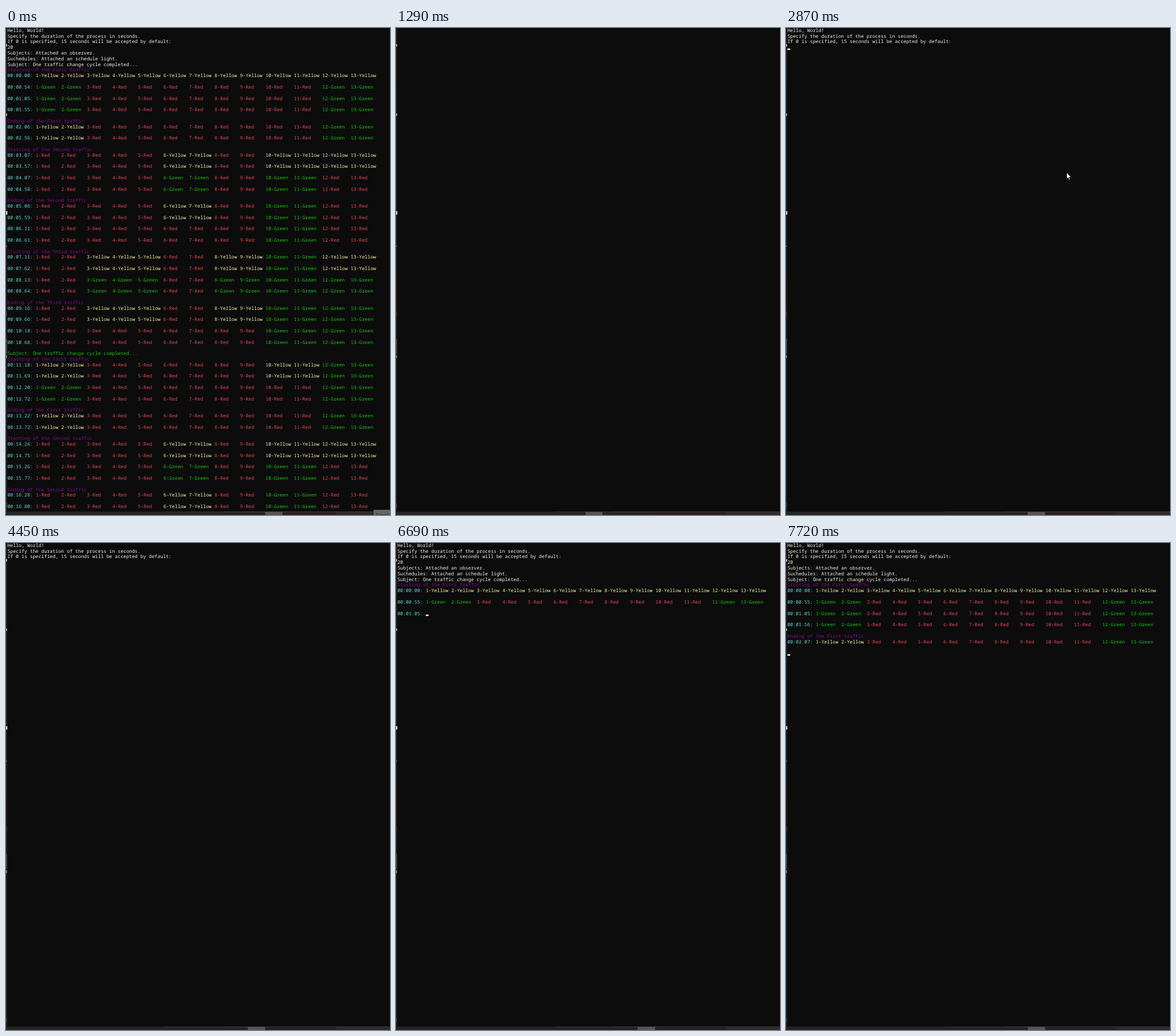
Recreate the animation shown at these times as an HTML page. Size 664 px wide and 843 px high, loop 8 s.

```html
<!DOCTYPE html>
<html lang="en">
<head>
<meta charset="utf-8">
<title>Traffic light console</title>
<style>
html, body { margin: 0; width: 100%; height: 100%; overflow: hidden; background: #0c0c0c; }
svg { display: block; }
text { font: 8.175px "Noto Sans Mono", "DejaVu Sans Mono", monospace; text-rendering: geometricPrecision; }
</style>
</head>
<body>
<svg id="stage" width="664" height="843" viewBox="0 0 664 843"></svg>
<script>
const LOOP = 8000, CW = 4.905, LH = 9.813, LEFT = 2.4;
const INK = { W: '#f2f2f2', C: '#61d6d6', M: '#8a0a92', R: '#e74856', G: '#16c60c', Y: '#f9f1a5' };
const WORD = { R: 'Red', G: 'Green', Y: 'Yellow' };
const stage = document.getElementById('stage');
const timed = [];

function add(tag, attrs, parent = stage) {
  const el = document.createElementNS('http://www.w3.org/2000/svg', tag);
  for (const k in attrs) el.setAttribute(k, attrs[k]);
  parent.appendChild(el);
  return el;
}
const rect = (x, y, width, height, fill) => add('rect', { x, y, width, height, fill });

// Text on the character grid, visible from one time until another
function print(row, col, str, ink, from, to = LOOP) {
  const el = add('text', { x: LEFT + col * CW, y: 6.8 + row * LH, fill: INK[ink] });
  el.textContent = str;
  timed.push({ el, from, to });
}

function lights(row, stamp, state, from, to, cellFrom = () => from) {
  print(row, 0, '00:' + stamp + ':', 'C', from, to);
  [...state].forEach((s, i) => {
    const col = i < 9 ? 10 + i * 9 : 91 + (i - 9) * 10;
    print(row, col, i + 1 + '-' + WORD[s], s, cellFrom(i), to);
  });
}

const INTRO = ['Hello, World!', 'Specify the duration of the process in seconds.',
  'If 0 is specified, 15 seconds will be accepted by default:'];
const SETUP = ['Subjects: Attached an observer.', 'Suchedules: Attached an schedule light.'];
const DONE = 'Subject: One traffic change cycle completed...';
const ALL = 'Y'.repeat(13), GO1 = 'GGRRRRRRRRRGG', END1 = 'YYRRRRRRRRRGG';
const PRE2 = 'RRRRRYYRRYYYY', GO2 = 'RRRRRGGRRGGRR', END2 = 'RRRRRYYRRGGRR';

// Window edges: slivers of the desktop around the console
rect(0, 0, 664, 843, '#0c0c0c');
rect(0, 0, 2.2, 843, '#1d1e1e');
[[0, 28, '#2b1c17'], [28, 4, '#b8b4ac'], [32, 22, '#2a1d18'], [54, 38, '#25241c'],
 [148, 4, '#a8a8a8'], [317, 6, '#c8c8c8'], [377, 1.2, '#8c8c8c'], [433, 57, '#32150f'],
 [491, 8, '#343434'], [538, 26, '#454542'], [567, 1.2, '#d2cfa8'], [569.5, 1.2, '#c8c8c8'],
 [822, 8, '#393939']].forEach(([y, h, c]) => rect(0, y, y > 300 && y < 330 ? 2.4 : 1.8, h, c));
rect(0, 837, 664, 6, '#242424');
rect(275, 837, 100, 1.2, '#33322a');
rect(375, 837, 195, 1.2, '#443c32');
rect(448, 838.2, 122, 4.8, '#2c1f1f');
rect(570, 837, 94, 1.2, '#4a3a37');
rect(570, 838.2, 94, 4.8, '#2f2826');
const tabs = [[448, 30], [328, 29], [418, 30]].map(([x, w]) => rect(x, 837.6, w, 5.4, '#555'));

const tip = add('g', {});
add('rect', { x: 635.5, y: 834, width: 29, height: 9, fill: '#666' }, tip);
add('text', { x: 639, y: 845.5, fill: '#222' }, tip).textContent = 'Terminal';

// First run, already complete
const FIRST_END = 1290;
const steps = [
  '>Starting of the First', ['00.00', ALL], ['00.54', GO1], ['01.05', GO1], ['01.55', GO1],
  '>Ending of the First', ['02.06', END1], ['02.56', END1],
  '>Starting of the Second', ['03.07', PRE2], ['03.57', PRE2], ['04.07', GO2], ['04.58', GO2],
  '>Ending of the Second', ['05.08', END2], ['05.59', END2], ['06.11', 'RRRRRRRRRGGRR'], ['06.61', 'RRRRRRRRRGGRR'],
  '>Starting of the Third', ['07.11', 'RRYYYRRYYGGYY'], ['07.62', 'RRYYYRRYYGGYY'],
  ['08.13', 'RRGGGRRGGGGGG'], ['08.64', 'RRGGGRRGGGGGG'],
  '>Ending of the Third', ['09.16', 'RRYYYRRYYGGGG'], ['09.66', 'RRYYYRRYYGGGG'],
  ['10.18', 'RRRRRRRRRGGGG'], ['10.68', 'RRRRRRRRRGGGG'],
  DONE,
  '>Starting of the First', ['11.18', 'YYRRRRRRRYYGG'], ['11.69', 'YYRRRRRRRYYGG'], ['12.20', GO1], ['12.72', GO1],
  '>Ending of the First', ['13.22', END1], ['13.72', END1],
  '>Starting of the Second', ['14.24', PRE2], ['14.75', PRE2], ['15.26', GO2], ['15.77', GO2],
  '>Ending of the Second', ['16.28', END2], ['16.80', END2]
];
[...INTRO, '20', ...SETUP, DONE].forEach((s, i) => print(i, 0, s, 'W', 0, FIRST_END));
let row = 7;
for (const s of steps) {
  if (Array.isArray(s)) {
    lights(row, s[0], s[1], 0, FIRST_END);
    row += 2;
  } else if (s[0] === '>') print(row++, 0, s.slice(1) + ' traffic', 'M', 0, FIRST_END);
  else print(row++, 0, s, 'G', 0, FIRST_END);
}

// Second run, typed and printed live
INTRO.forEach((s, i) => print(i, 0, s, 'W', 1370));
print(3, 0, '2', 'W', 5270);
print(3, 1, '0', 'W', 5320);
[...SETUP, DONE].forEach((s, i) => print(4 + i, 0, s, 'W', 5650));
print(7, 0, 'Starting of the First traffic', 'M', 5650);
lights(8, '00.00', ALL, 5650, LOOP, i => i < 7 ? 5690 : 5730);
lights(10, '00.55', GO1, 6190, LOOP, () => 6230);
lights(12, '01.05', GO1, 6690, LOOP, () => 6730);
lights(14, '01.56', GO1, 7220, LOOP);
print(16, 0, 'Ending of the First traffic', 'M', 7640);
lights(17, '02.07', END1, 7640, LOOP, () => 7720);

// Caret: time, row, column; a row of -1 hides it
const caretKeys = [[0, -1, 0], [1410, 3, 0], [2330, -1, 0], [2870, 3, 0], [3370, -1, 0], [3910, 3, 0],
  [4450, -1, 0], [4980, 3, 0], [5270, 3, 1], [5320, 3, 2], [5480, -1, 0], [5650, 8, 10], [5690, 8, 73],
  [5730, 10, 0], [6190, 10, 10], [6230, 12, 0], [6690, 12, 10], [6730, 14, 0], [7220, 16, 0],
  [7640, 17, 10], [7720, 19, 0]];
const caret = rect(0, 0, CW, 2.5, INK.W);

// Mouse pointer: time, x, y; a negative x hides it
const mouseKeys = [[0, -1, 0], [2330, 616, 269], [2370, 500, 256], [2410, -1, 0], [2870, 485.5, 250.5],
  [2910, 545, 248], [2990, 600, 246], [3060, 617, 245], [3120, -1, 0]];
const mouse = add('path', { d: 'M0 0V10.6L2.4 8.3L4 12.1L5.6 11.4L4 7.8H7.2Z',
  fill: '#fff', stroke: '#000', 'stroke-width': 0.5 });

const show = (el, on) => el.setAttribute('visibility', on ? 'visible' : 'hidden');
const keyAt = (keys, t) => keys.filter(k => k[0] <= t).pop();

function draw(t) {
  for (const { el, from, to } of timed) show(el, t >= from && t < to);

  const [, r, c] = keyAt(caretKeys, t);
  show(caret, r >= 0);
  caret.setAttribute('x', LEFT + c * CW);
  caret.setAttribute('y', (r + 1) * LH - 3.7);

  const [, mx, my] = keyAt(mouseKeys, t);
  show(mouse, mx >= 0);
  mouse.setAttribute('transform', `translate(${mx} ${my})`);

  const swap = t < 540 ? 0 : t < 585 ? 0.4 : t < 630 ? 0.75 : 1;
  const live = t >= 1330;
  tabs[0].setAttribute('opacity', 1 - swap);
  tabs[1].setAttribute('opacity', live ? 0 : swap);
  tabs[2].setAttribute('opacity', live ? 1 : 0);
  tip.setAttribute('opacity', t < 40 ? 1 : t < 80 ? 0.4 : 0);
}

function tick() {
  draw(performance.now() % LOOP);
  requestAnimationFrame(tick);
}
tick();
</script>
</body>
</html>
```
